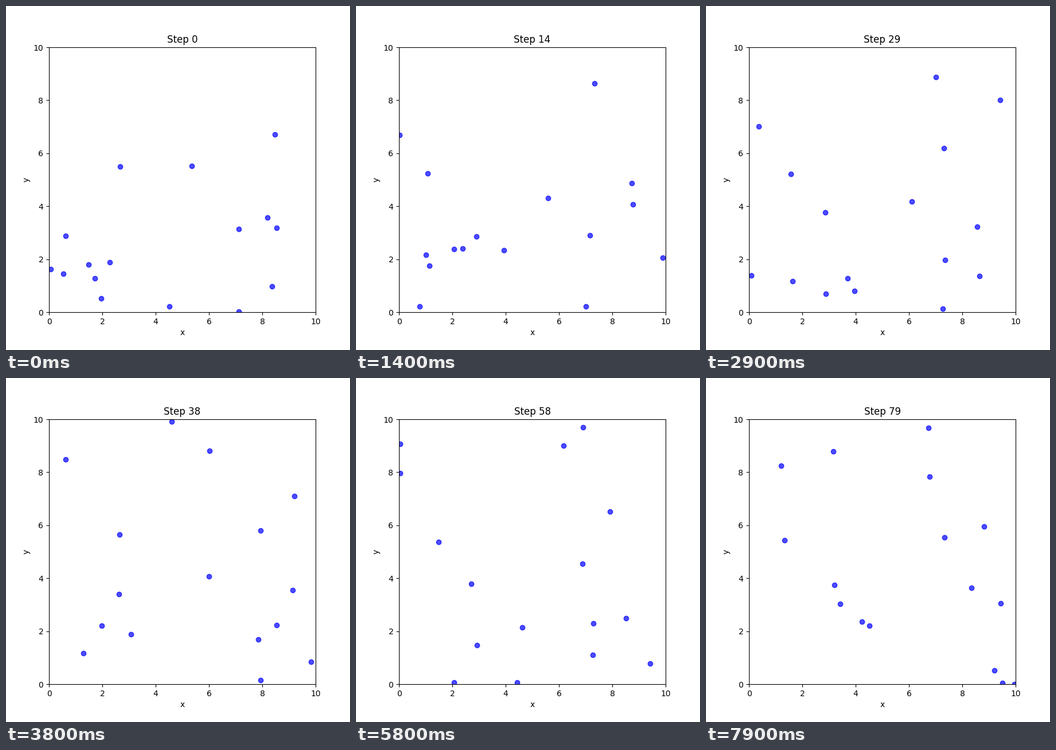
A matplotlib script for the animation above (8 s loop, 600 by 600 pixels).

```python
import numpy as np
import matplotlib.pyplot as plt
from matplotlib.animation import FuncAnimation

SIZE = 10       # side of the periodic box
STEPS = 80
STRIDE = 0.4    # largest move along one axis in one step

START = np.array([
    (2.67, 5.50), (5.35, 5.52), (8.47, 6.71), (8.54, 3.18),
    (8.19, 3.57), (7.12, 3.14), (0.62, 2.88), (1.48, 1.80),
    (2.28, 1.88), (1.72, 1.28), (1.96, 0.52), (0.06, 1.62),
    (0.54, 1.45), (4.52, 0.22), (7.12, 0.02), (8.36, 0.97),
])


def random_walk(start, steps, seed=7):
    """Positions at every step; particles leaving one side re-enter opposite."""
    rng = np.random.default_rng(seed)
    moves = rng.uniform(-STRIDE, STRIDE, (steps,) + start.shape)
    moves[0] = 0
    return (start + np.cumsum(moves, axis=0)) % SIZE


walk = random_walk(START, STEPS)

fig, ax = plt.subplots(figsize=(6, 6), dpi=100)
ax.set_xlim(0, SIZE)
ax.set_ylim(0, SIZE)
ax.set_xlabel("x")
ax.set_ylabel("y")
title = ax.set_title("Step 0")
dots, = ax.plot([], [], "bo", alpha=0.7)


def update(step):
    dots.set_data(walk[step, :, 0], walk[step, :, 1])
    title.set_text(f"Step {step}")
    return dots, title


anim = FuncAnimation(fig, update, frames=STEPS, interval=100, repeat=True,
                     repeat_delay=0)
plt.show()
```
